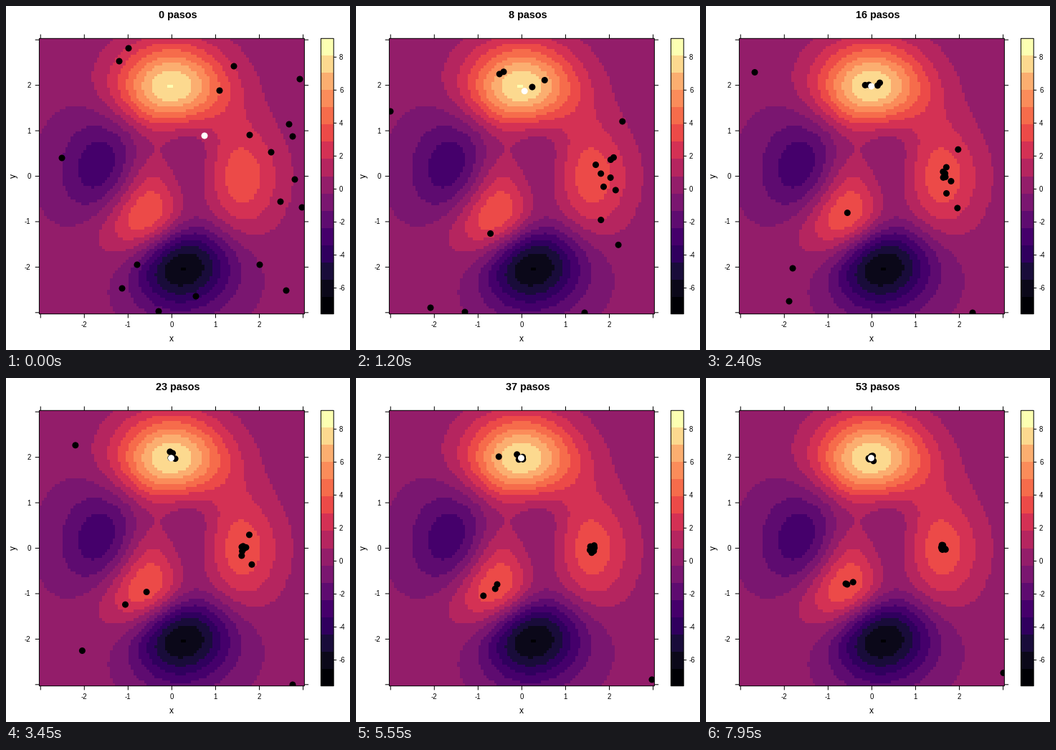
A matplotlib script that plays this animation: 480x480 px, repeating every 8 s.

```python
import numpy as np
import matplotlib.pyplot as plt
from matplotlib.animation import FuncAnimation
from matplotlib.colors import ListedColormap
from matplotlib.patches import Rectangle

SIZE, DPI = 480, 100
PT = 72 / DPI                      # points per pixel
LEFT, RIGHT, TOP, BOTTOM = 46.4, 416.4, 45.3, 429.7
KEY_LEFT, KEY_RIGHT = 439.4, 457.2
HALF = 3.03                        # half the panel's width in data units
SCALE = 1.25                       # stretch of the peaks surface
LEVELS = 16
TICKS_PER_STEP = 3                 # 150 ms per step at a 50 ms interval
ROUTE_STRIDE = 8                   # steps between the points of a route

PALETTE = ["#000004", "#0b0819", "#190c3a", "#30005e", "#45006b", "#5e0b70",
           "#7a1670", "#931d6a", "#b5255f", "#d43154", "#ec4a48", "#f66c4b",
           "#fb8c5a", "#fbae70", "#fcd98f", "#fcffb2"]

# Starting points in pixels, grouped by the summit that attracts them
TOP_SUMMIT, RIGHT_SUMMIT, LOW_SUMMIT = (230.5, 111.7), (330, 237), (196.5, 288)
SWARMS = {
    TOP_SUMMIT: [(158, 77), (171, 59), (298, 118), (318, 84)],
    RIGHT_SUMMIT: [(395, 165), (340, 180), (370, 204), (413, 281), (383, 273),
                   (400, 182), (403, 242), (410, 102), (354, 361), (391, 397)],
    LOW_SUMMIT: [(183, 361)],
}
LEADER_START = (277, 181)

# Explorers that stray far before settling
ROUTES = [
    [(78, 212), (48, 147), (68, 92.5), (101, 94), (153, 106), (227, 112)],
    [(162, 394), (104, 421), (121, 366), (173, 309), (197, 288)],
    [(213, 426), (152, 427), (116, 412), (105, 376), (149, 332), (195, 287)],
    [(265, 405), (319, 428), (372, 428), (404, 428), (412, 424), (413.5, 419), (415, 411.5)],
]


def peaks(x, y):
    return (3 * (1 - x) ** 2 * np.exp(-x**2 - (y + 1) ** 2)
            - 10 * (x / 5 - x**3 - y**5) * np.exp(-x**2 - y**2)
            - np.exp(-(x + 1) ** 2 - y**2) / 3)


def px(x):
    return (LEFT + RIGHT) / 2 + x * (RIGHT - LEFT) / (2 * HALF)


def py(y):
    return (TOP + BOTTOM) / 2 - y * (BOTTOM - TOP) / (2 * HALF)


def attract(starts, summit, step, tau=None):
    """Flies close in on a summit; those far away feel a weaker pull."""
    gap = np.subtract(starts, summit)
    if tau is None:
        tau = 2.5 + np.linalg.norm(gap, axis=1, keepdims=True) / 15
    return summit + gap * np.exp(-(step / tau) ** 1.2)


def follow(route, step):
    times = ROUTE_STRIDE * np.arange(len(route))
    return [np.interp(step, times, axis) for axis in zip(*route)]


def positions(step):
    """All flies, the leader last."""
    swarm = np.vstack([attract(s, summit, step) for summit, s in SWARMS.items()])
    restless = min(1, step / 8)
    swarm += np.random.default_rng(step).normal(0, (2.4, 3.2), swarm.shape) * restless
    explorers = [follow(route, step) for route in ROUTES]
    leader = attract([LEADER_START], TOP_SUMMIT, step, tau=4)
    return np.vstack([swarm, explorers, leader])


fig = plt.figure(figsize=(SIZE / DPI, SIZE / DPI), dpi=DPI, facecolor="white")
ax = fig.add_axes((0, 0, 1, 1))
ax.set_axis_off()


def label(x, y, text, size=9.6, **style):
    style = {"ha": "center", "va": "baseline", **style}
    return ax.text(x, y, text, fontsize=size * PT, family="Liberation Sans", **style)


def line(x0, y0, x1, y1):
    ax.plot((x0, x1), (y0, y1), color="black", lw=PT, snap=False,
            solid_capstyle="butt", zorder=2)


def frame(x0, x1):
    return ax.add_patch(Rectangle((x0, TOP), x1 - x0, BOTTOM - TOP, fill=False,
                                  lw=PT, snap=False, zorder=5))


def bands(values, x0, x1):
    """Filled cells, aligned to whole pixels."""
    ax.imshow(values, extent=np.round((x0, x1, BOTTOM, TOP)), origin="lower",
              cmap=ListedColormap(PALETTE), vmin=-0.5, vmax=LEVELS - 0.5,
              aspect="auto", interpolation="nearest")


# Surface and colour key
grid = np.linspace(-3, 3, 101) / SCALE
z = peaks(*np.meshgrid(grid, grid))
margin = 0.07 * np.ptp(z)
low, high = z.min() - margin, z.max() + margin
bands(np.floor((z - low) / (high - low) * LEVELS), LEFT, RIGHT)
bands(np.arange(LEVELS)[:, None], KEY_LEFT, KEY_RIGHT)
panel = frame(LEFT, RIGHT)
frame(KEY_LEFT, KEY_RIGHT)
ax.set(xlim=(0, SIZE), ylim=(SIZE, 0))

# Axes
for v in range(-3, 4):
    line(px(v), BOTTOM, px(v), BOTTOM + 5.7)
    line(px(v), TOP, px(v), TOP - 5.7)
    line(LEFT, py(v), LEFT - 5.7, py(v))
    line(RIGHT, py(v), RIGHT + 5.7, py(v))
    if abs(v) < 3:
        label(px(v), 448, v)
        label(34.5, py(v) + 3.5, v, ha="right")
for v in range(-6, 9, 2):
    y = BOTTOM - (v - low) / (high - low) * (BOTTOM - TOP)
    line(KEY_RIGHT, y, KEY_RIGHT + 4, y)
    label(465, y + 3.5, v, ha="left")
label(231, 468.5, "x", 12)
label(16.5, 237.5, "y", 12, rotation=90, ha="right")
title = label(240, 17, "", 14.4, weight="bold")

start = positions(0)
flies = ax.scatter(*start.T, s=(9 * PT) ** 2, linewidths=0, snap=False, zorder=4,
                   c=["black"] * (len(start) - 1) + ["white"])
flies.set_clip_path(panel)


def update(i):
    step = i // TICKS_PER_STEP
    flies.set_offsets(positions(step))
    title.set_text(f"{step} pasos")
    return flies, title


anim = FuncAnimation(fig, update, frames=160, interval=50, repeat=True, repeat_delay=0)
plt.show()
```
